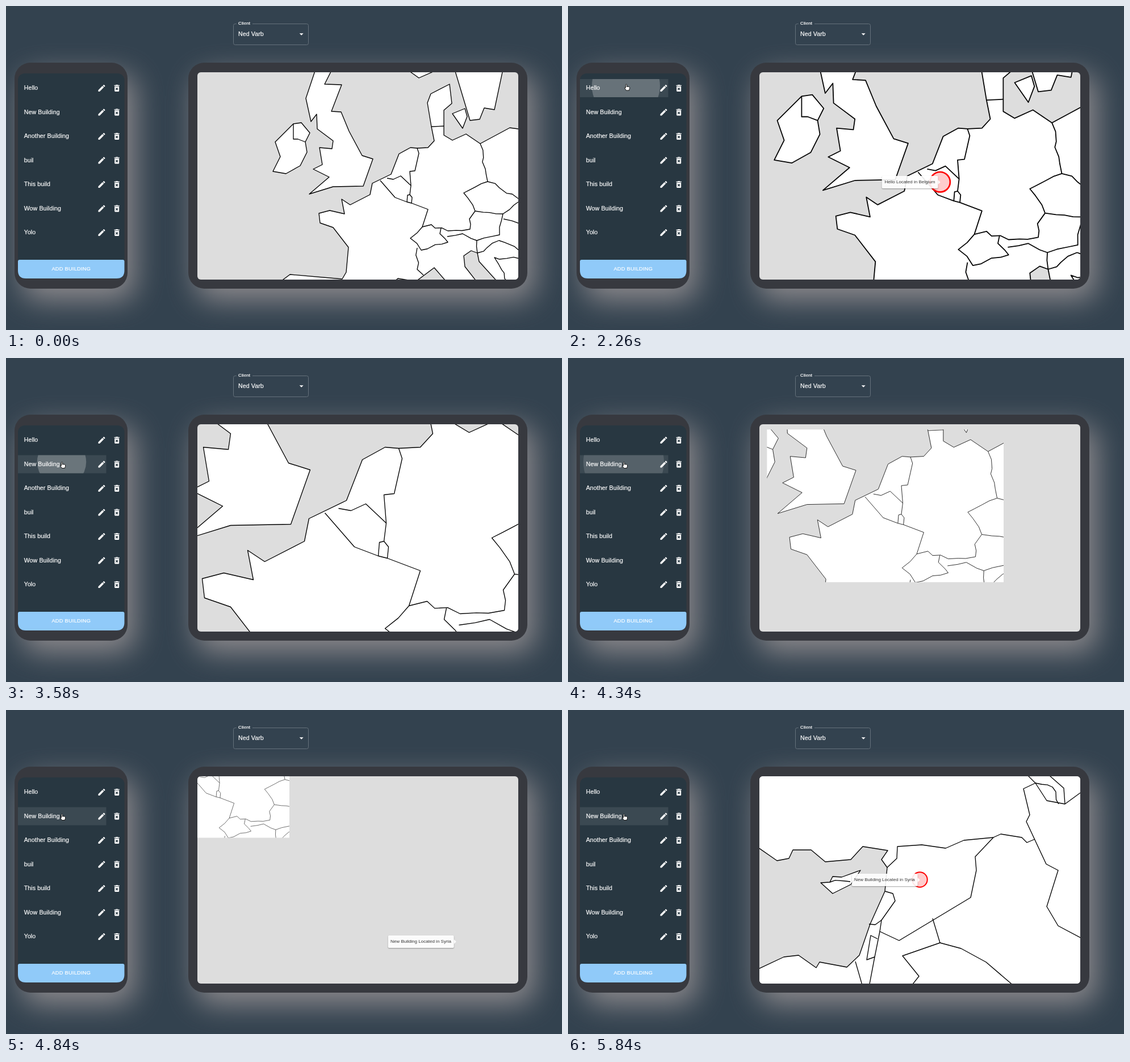
These frames come from a looping animation (979 by 572 pixels, 5980 ms). An HTML page:

```html
<!DOCTYPE html>
<html lang="en">
<head>
<meta charset="utf-8">
<title>Building map</title>
<style>
  html, body { margin: 0; width: 100%; height: 100%; overflow: hidden; background: #33424f; }
  body { position: relative; font-family: "Liberation Sans", Arial, sans-serif; color: #fff; }
  .device { position: absolute; top: 100px; height: 399px; border-radius: 28px; background: #37393f;
            box-shadow: 13px 20px 52px #8e8b8e; }
  #phone { left: 15px; width: 199px; }
  #tablet { left: 320.5px; width: 597.5px; }
  #map { position: absolute; left: 337px; top: 117px; width: 564.5px; height: 365.5px;
         border-radius: 6px; overflow: hidden; background: #ddd; }
  svg { position: absolute; left: 0; top: 0; }
  svg text { fill: #fff; stroke: #fff; stroke-width: .2px; font-size: 10.6px; letter-spacing: .1px; }
  #europe, #levant { fill: #fff; stroke: #000; stroke-linejoin: round; }
  #europe .sea, #levant .sea { fill: #ddd; }
  polyline { fill: none; }
  #map .marker { fill: red; fill-opacity: .2; stroke: red; }
  .tip { position: absolute; box-sizing: border-box; height: 22px; padding: 0 4.7px; border-radius: 2px;
         background: #fff; color: #222; font-size: 8.05px; line-height: 22px; white-space: nowrap;
         box-shadow: 0 1px 2px rgba(0,0,0,.4); transform: translate(calc(-100% - 4px), -50%); }
  .tip::after { content: ""; position: absolute; left: 100%; top: 7px; border: 4px solid transparent; border-left-color: #fff; }
</style>
</head>
<body>
<div class="device" id="phone"></div>
<div class="device" id="tablet"></div>
<div id="map">
  <svg width="565" height="366" viewBox="337 117 565 366">
    <defs><clipPath id="drawn"><rect x="518.75" y="211.5" width="338.5" height="219"/></clipPath></defs>
    <g id="europe">
      <!-- Britain, Ireland -->
      <polygon points="545,112 528,163 537,204 547,191 548,217 576,238 574,252 552,250 557,280 541,288 569,302 534,332 576,319 629,318 646,270 627,264 604,221 590,187 573,186 591,139 561,138 574,112"/>
      <polygon points="506,208 520,206 535,224 527,240 530,258 518,282 493,296 470,292 483,266 474,240"/>
      <polyline points="506,208 506,235 514,235 527,240"/>
      <!-- Scandinavia -->
      <polygon points="706,112 727,127 752,116"/>
      <polygon points="790,112 817,202 834,200 842,180 860,183 875,112"/>
      <polygon points="786,190 808,181 812,195 804,216"/>
      <!-- Continent and its southern seas -->
      <polygon points="749,213 754,238 743,250 724,251 712,250 692,261 678,297 645,313 641,333 606,351 591,341 596,367 570,361 551,366 553,383 576,391 603,426 599,470 592,482 500,474 480,489 480,600 1000,600 1000,230 887,215 835,243 810,226 786,237 771,228 771,184 785,172 781,138 748,155 742,171"/>
      <polygon class="sea" points="678,492 690,481 722,486 754,462 780,492"/>
      <polygon class="sea" points="833,492 808,460 806,441 819,432 830,436 833,451 870,492"/>
      <!-- Low Countries and the Rhine -->
      <polyline points="749,213 771,212"/>
      <polyline points="724,251 727,260 720,291 711,292 713,317 711,333 707,334 706,346"/>
      <polyline points="671,304 682,306 695,300 713,317"/>
      <polyline points="659,308 685,338 706,346 714,348 715,338 711,333"/>
      <polyline points="714,348 743,359 733,390"/>
      <!-- Alps, Czechia, Balkans -->
      <polyline class="rough" points="733,390 749,386 778,397 817,394 816,376 826,362"/>
      <polyline class="rough" points="733,390 712,410 731,431 778,417 764,402 766,392"/>
      <polyline class="rough" points="724,427 724,465 735,475"/>
      <polyline class="rough" points="777,407 804,402 829,414 869,404 875,367"/>
      <polyline class="rough" points="835,243 848,310 902,340"/>
      <polyline class="rough" points="848,310 806,330 826,362 875,367 902,346"/>
      <polyline class="rough" points="876,376 904,384"/>
      <polyline class="rough" points="829,414 830,436 868,414 904,432"/>
      <polyline class="rough" points="904,446 860,444 886,492"/>
      <circle class="marker" id="helloMarker" cx="688" cy="321"/>
    </g>
    <g id="levant" stroke-width="1.33">
      <rect x="330" y="110" width="580" height="380"/>
      <polygon class="sea" points="325,236 368,266 389,262 396,247 428,247 453,268 498,264 519,241 563,248 552,264 562,278 558,320 532,378 513,433 491,454 443,445 437,455 406,433 380,436 325,462"/>
      <!-- Cyprus -->
      <polygon points="445,305 461,304 466,294 482,295 515,283 498,308 466,324"/>
      <polyline class="rough" points="461,304 497,303"/>
      <!-- Syria and its neighbours -->
      <polyline points="562,278 579,262 580,241 623,238 665,244 697,230 749,225 762,219 799,225 808,234 822,228"/>
      <polyline points="749,225 717,259 719,283 709,331 583,407 549,391"/>
      <polyline points="642,368 655,411 589,434 618,470 603,489"/>
      <polyline points="655,411 692,421 736,445 785,487"/>
      <polyline points="558,320 572,324 576,337 552,371 549,391 540,436 530,489"/>
      <polyline points="530,378 541,379 552,371"/>
      <polyline points="545,404 533,398 526,441 540,436"/>
      <polyline points="506,444 519,489"/>
      <!-- Caucasus and Iran -->
      <polyline points="806,112 823,129 802,139 813,185 807,197 842,272 863,283 843,347 863,381 906,404"/>
      <polyline points="823,129 843,160 875,166 905,144"/>
      <polyline class="rough" points="823,129 853,136 864,166"/>
      <polyline points="848,116 873,138 875,166"/>
      <circle class="marker" cx="619.5" cy="299.5" r="13.2" stroke-width="2"/>
    </g>
  </svg>
  <div class="tip" id="helloTip">Hello Located in Belgium</div>
  <div class="tip" id="newTip">New Building Located in Syria</div>
</div>
<svg id="ui" width="979" height="572"></svg>

<script>
const $ = id => document.getElementById(id);
const LOOP = 5980;
const CENTER = [619.5, 299.5], BELGIUM = [688, 321], SYRIA = [1202, 646];

const progress = (t, start, length) => Math.min(1, Math.max(0, (t - start) / length));
const mix = (a, b, k) => a + (b - a) * k;

let seed = 7;
const random = () => (seed = seed * 16807 % 2147483647) / 2147483647;

// Breaks each straight stretch of a border into short uneven steps
function roughen(line) {
  const corners = [...line.points], result = [];
  corners.forEach((b, i) => {
    const a = corners[i - 1] || b;
    const steps = Math.max(1, Math.round(Math.hypot(b.x - a.x, b.y - a.y) / 12));
    for (let n = 1; n < steps; n++) {
      const wobble = () => random() * 6 - 3;
      result.push([mix(a.x, b.x, n / steps) + wobble(), mix(a.y, b.y, n / steps) + wobble()]);
    }
    result.push([b.x, b.y]);
  });
  line.setAttribute("points", result.join(" "));
}
document.querySelectorAll(".rough").forEach(roughen);

// Phone, select field and pointer
const PENCIL = "M3 17.25V21h3.75L17.81 9.94l-3.75-3.75zM20.71 7.04q.7-.7 0-1.41l-2.34-2.34q-.7-.7-1.41 0l-1.83 1.83 3.75 3.75z";
const BIN = "M6 19q0 2 2 2h8q2 0 2-2V7H6zM8.46 11.88l1.41-1.41L12 12.59l2.12-2.12 1.41 1.41L13.41 14l2.12 2.12-1.41 1.41L12 15.41l-2.12 2.12-1.41-1.41L10.59 14zM15.5 4l-1-1h-5l-1 1H5v2h14V4z";
const names = ["Hello", "New Building", "Another Building", "buil", "This build", "Wow Building", "Yolo"];
const rowTop = i => 129 + 42.5 * i;
const icon = (path, x, i) => `<path fill="#fff" transform="translate(${x} ${rowTop(i) + 8}) scale(.665)" d="${path}"/>`;
const rowBox = i => `x="21" y="${rowTop(i)}" width="155.5" height="32"`;
const hover = i => `<clipPath id="row${i}"><rect ${rowBox(i)}/></clipPath>
  <rect id="hover${i}" ${rowBox(i)} fill="#fff"/>
  <circle id="ripple${i}" clip-path="url(#row${i})" cx="${102 - 4 * i}" cy="${rowTop(i) + 12}" fill="#fff"/>`;

$("ui").innerHTML = `
  <rect x="21" y="119" width="187.5" height="362" rx="12" fill="#283741"/>
  ${hover(0)}${hover(1)}
  ${names.map((name, i) => `<text x="31.7" y="${rowTop(i) + 19.3}">${name}</text>`
    + icon(PENCIL, 160.5, i) + icon(BIN, 187.2, i)).join("")}
  <path fill="#90caf9" d="M21 451q0-3 3-3H205.5q3 0 3 3V467q0 14-14 14H35q-14 0-14-14z"/>
  <text x="114.8" y="467" text-anchor="middle" style="font-size:9.24px;letter-spacing:.26px">ADD BUILDING</text>
  <path fill="none" stroke="#65717b" d="M405.5 31.5H403.5q-3 0-3 3V65.5q0 3 3 3H529.5q3 0 3-3V34.5q0-3-3-3H434"/>
  <text x="409" y="33.3" style="font-size:8px">Client</text>
  <text x="409" y="52.5">Ned Varb</text>
  <path fill="#fff" d="M516.7 48.3h7l-3.5 3.5z"/>
  <path id="pointer" fill="#fff" stroke="#111" stroke-linejoin="round"
    d="M-2.5-4.3a1 1 0 0 1 2 0V-1Q4.5-2 4.7 1q0 2-1 3.2V5.5H-1.7Q-3.5 2.5-4.5.6-4.4-.6-2.5 1Z"/>`;

// Smooth zoom-and-pan flight: zooms out and back in along a hyperbolic path
function flight(from, to, scale0, scale1, start) {
  const { cosh, sinh, tanh, asinh, hypot } = Math;
  const rho = 1.42, rho2 = rho * rho, w0 = 564.5, w1 = w0 * scale0 / scale1;
  const distance = hypot(to[0] - from[0], to[1] - from[1]) * scale0;
  const r = (w, sign) => -asinh((w1 * w1 - w0 * w0 + sign * (rho2 * distance) ** 2) / (2 * w * rho2 * distance));
  const r0 = r(w0, 1), span = r(w1, -1) - r0, duration = 800 * span / rho;
  return {
    end: start + duration,
    at(t) {
      const x = r0 + span * (1 - (1 - progress(t, start, duration)) ** 1.5);
      const k = w0 * (cosh(r0) * tanh(x) - sinh(r0)) / rho2 / distance;
      return { scale: scale0 * cosh(x) / cosh(r0), focus: from.map((v, i) => mix(v, to[i], k)) };
    }
  };
}
const toBelgium = flight(CENTER, BELGIUM, 1, 2, 2120);
const toSyria = flight(BELGIUM, SYRIA, 2, 2, 4115);

const glide = (t, start, length) => {
  const p = progress(t, start, length);
  return p * p * (3 - 2 * p);
};

// The pointer sweeps in from the left, settles on the first row, then drops to the second
function pointerAt(t) {
  const enter = glide(t, 240, 240), settle = glide(t, 480, 220), drop = glide(t, 2940, 340);
  return `translate(${-14 + 148 * enter - 30 * settle - 4 * drop} ${162 - 31 * enter + 12.5 * settle + 45.5 * drop})`;
}

function setRipple(i, t, start, grow, radius, release, fade) {
  const p = progress(t, start, grow);
  $("ripple" + i).setAttribute("r", radius * (1 - (1 - p) ** 2));
  $("ripple" + i).setAttribute("opacity", .24 * (1 - progress(t, release, fade)));
}

function placeTip(id, point, { scale, focus }, opacity) {
  const tip = $(id);
  tip.style.left = CENTER[0] + (point[0] - focus[0]) * scale - 337 + "px";
  tip.style.top = CENTER[1] + (point[1] - focus[1]) * scale - 117 + "px";
  tip.style.opacity = opacity;
}

function draw(t) {
  const landed = t >= toBelgium.end, arrived = t >= toSyria.end;
  const camera = (landed ? toSyria : toBelgium).at(t);
  const { scale, focus } = camera, base = landed ? 2 : 1;
  const helloShown = t >= 1160 && t < 3440;

  const map = $("europe");
  map.setAttribute("transform", `translate(${CENTER}) scale(${scale}) translate(${-focus[0]} ${-focus[1]})`);
  map.setAttribute("stroke-width", 1.33 / base);
  map.setAttribute("clip-path", landed ? "url(#drawn)" : "none");
  map.style.display = arrived ? "none" : "";
  $("levant").style.display = arrived ? "" : "none";

  const dot = $("helloMarker");
  dot.setAttribute("r", 13.2 / base);
  dot.setAttribute("stroke-width", 2 / base);
  dot.style.display = helloShown ? "" : "none";
  placeTip("helloTip", BELGIUM, camera, helloShown ? .9 * progress(t, 1160, 200) : 0);
  placeTip("newTip", SYRIA, camera, t >= 3440 ? .9 : 0);

  const helloHover = .13 * progress(t, 1140, 150) - .04 * progress(t, 2100, 100) - .09 * progress(t, 2400, 160);
  $("hover0").setAttribute("opacity", Math.max(0, helloHover));
  $("hover1").setAttribute("opacity", .09 * progress(t, 3420, 100));
  setRipple(0, t, 2100, 285, 74, 2240, 330);
  setRipple(1, t, 3420, 430, 71, 4115, 500);
  $("pointer").setAttribute("transform", pointerAt(t));
}

function tick() {
  draw(performance.now() % LOOP);
  requestAnimationFrame(tick);
}
tick();
</script>
</body>
</html>
```
